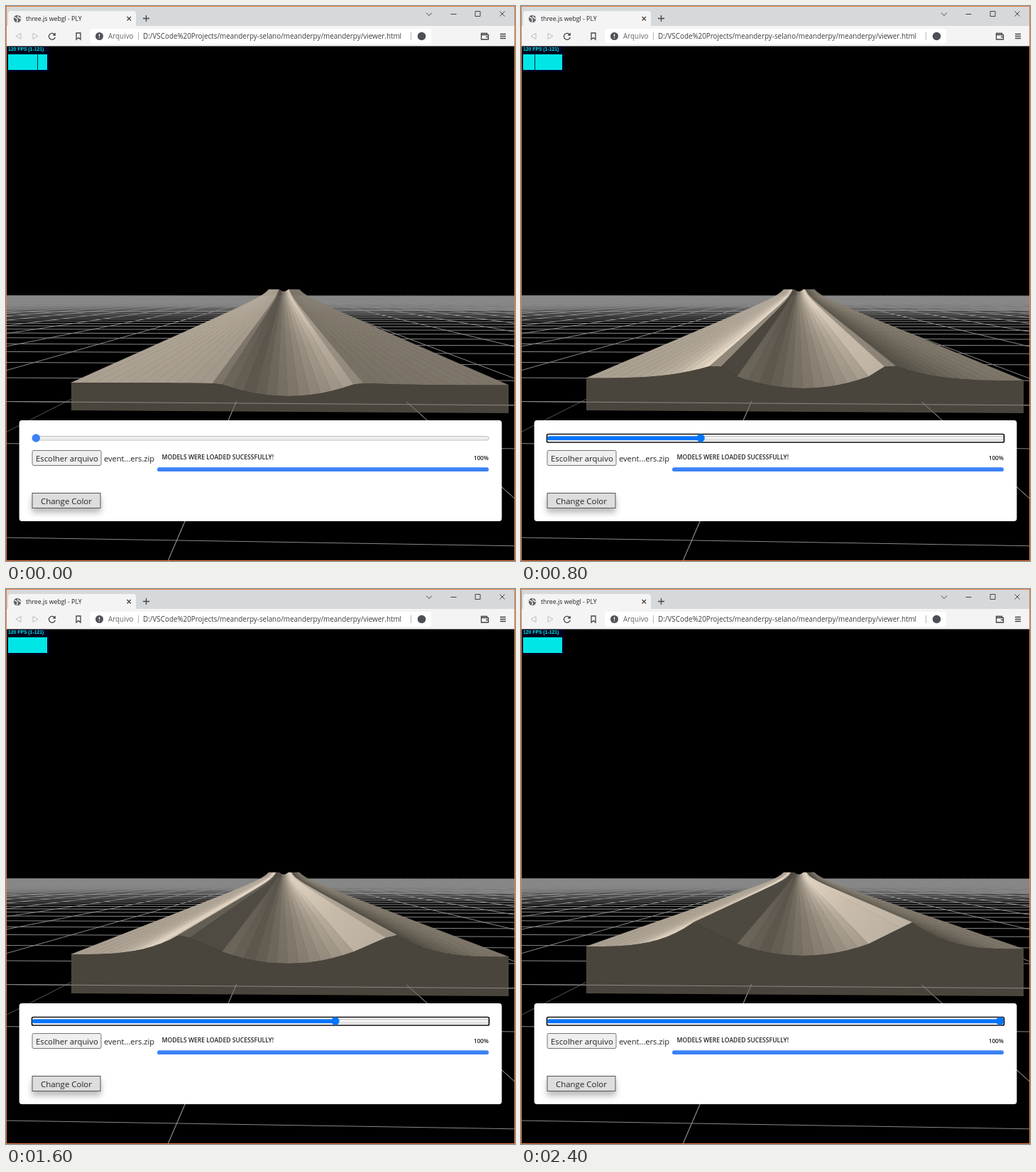
These frames come from a looping animation (717 by 781 pixels, 2600 ms). An HTML page with a canvas:

```html
<!DOCTYPE html>
<html lang="pt">
<head>
<meta charset="utf-8">
<title>three.js webgl - PLY</title>
<style>
html, body { margin: 0; width: 100%; height: 100%; overflow: hidden; background: #000; }
canvas, svg { position: absolute; left: 0; top: 0; width: 717px; height: 781px; }
text { font-family: "Open Sans", "Noto Sans", sans-serif; fill: #222; white-space: pre; }
.icon { fill: none; stroke: #444; stroke-width: 1; }
.bold { stroke-width: 1.3; }
#fps { font: bold 6.8px "Liberation Sans", Arial, sans-serif; fill: #00e6e6; }
</style>
</head>
<body>
<canvas id="scene" width="717" height="781"></canvas>
<svg viewBox="0 0 717 781">
  <defs>
    <filter id="shadow" x="-30%" y="-50%" width="160%" height="250%">
      <feDropShadow dx="0" dy="6" stdDeviation="4.5" flood-color="#000" flood-opacity=".28"/>
    </filter>
  </defs>

  <!-- browser frame -->
  <rect width="717" height="29" fill="#d5d9dc"/>
  <rect y="28" width="717" height="28.5" fill="#f4f4f4"/>
  <path d="M3 29V11q0-4 4-4H179q4 0 4 4V29z" fill="#f4f4f4"/>
  <circle cx="16" cy="18" r="5.2" fill="#5f6368"/>
  <path d="M12 16q3 .5 4 2.5t-1 4M17 13.5q-1 2.5 1 3t3 2" fill="none" stroke="#f4f4f4" stroke-width="1.3"/>
  <text x="28" y="21" font-size="8.75">three.js webgl - PLY</text>
  <path class="icon bold" d="M170.500 15l5.500 5.500m0-5.500l-5.500 5.500M193 17.500h9m-4.500-4.500v9"/>
  <path class="icon" d="M592 9.500l4 4 4-4M626.500 11.500h8M661 7.500h7v7h-7zM695.500 7.500l7 7m0-7l-7 7"/>
  <path class="icon" d="M21 38.500v8l-7-4zM38 38.500v8l7-4z" style="stroke:#bcbcbc"/>
  <path class="icon bold" d="M68.500 40a4.500 4.500 0 1 0 .8 4"/>
  <path d="M69.800 37.500v4.200h-4.200z" fill="#444"/>
  <path class="icon bold" d="M99 38h6v9l-3-2.500-3 2.500z"/>
  <rect x="118" y="32" width="481" height="21" rx="4" fill="#fff"/>
  <circle cx="131.500" cy="42.500" r="5.500" fill="#505358"/>
  <path d="M131.500 39.500v3.500m0 1.200v1.400" stroke="#fff" stroke-width="1.3"/>
  <text x="144" y="46" font-size="9.87" style="fill:#666">Arquivo</text>
  <path d="M186.500 37v11M570.500 37v11" stroke="#b5b8bb"/>
  <text x="193" y="46" font-size="9.87" style="fill:#3c3c3c">D:/VSCode%20Projects/meanderpy-selano/meanderpy/meanderpy/viewer.html</text>
  <circle cx="585.500" cy="42.500" r="5.800" fill="#4c4f54"/>
  <path class="icon bold" d="M669.500 40.500h10v6.500h-10zM669.500 40.500v-2h8v2M676 43.500h3.500"/>
  <path class="icon bold" d="M696 39.500h8m-8 3h8m-8 3h8"/>

  <!-- frame counter -->
  <rect x="1" y="57" width="60" height="36" fill="#00001f"/>
  <text id="fps" x="3" y="63.300">120 FPS (1-121)</text>
  <rect x="3" y="68" width="55" height="22" fill="#00e6e6"/>
  <rect id="tick" y="68" width="1" height="22" fill="#012a3a"/>

  <!-- control panel -->
  <rect x="18.600" y="583" width="679.800" height="142" rx="4" fill="#fff"/>
  <rect x="37" y="605.500" width="643" height="5.500" rx="2.700" fill="#efefef" stroke="#b2b2b2" stroke-width=".8"/>
  <g id="focus">
    <rect x="36.500" y="602.500" width="644" height="11.500" rx="2" fill="none" stroke="#101010" stroke-width="1.700"/>
    <rect id="fill" x="37" y="605.400" width="0" height="5.600" rx="2.800" fill="#0075ff"/>
  </g>
  <circle id="thumb" cy="608" r="5.700"/>
  <rect x="37" y="625.500" width="97" height="21" rx="2" fill="#efefef" stroke="#767676"/>
  <text x="42" y="640.500" font-size="11.35">Escolher arquivo</text>
  <text x="138" y="640.500" font-size="11.1">event...ers.zip</text>
  <text x="219.500" y="638" font-size="8.6" font-weight="600">MODELS WERE LOADED SUCESSFULLY!</text>
  <text x="680" y="638.500" font-size="8.3" font-weight="600" text-anchor="end">100%</text>
  <rect x="213" y="649.300" width="467" height="5.800" rx="2.900" fill="#3b82f6"/>
  <rect x="37" y="685.500" width="96" height="21" fill="#ddd" stroke="#555" filter="url(#shadow)"/>
  <text x="49" y="700.500" font-size="11.45">Change Color</text>
  <rect x=".5" y=".5" width="716" height="780" fill="none" stroke="#ee7a3a"/>
</svg>

<script>
const $ = id => document.getElementById(id);
const ctx = $('scene').getContext('2d');
const STEP = 200, COUNT = 13;
const VX = 391, VY = 402;            // vanishing point
const MID = 397, BANK = 92.5;        // channel axis and half width
const GROUND = 530, DEPTH = 14.3;    // front height, depth of the far end

const mix = (a, b, t) => a + (b - a) * t;

// Cross-section at the front: two levees that grow beside a rising channel.
function profile(p) {
  const bed = mix(549, 516, p), bank = bed - 16.5;
  const edge = 530 - 27 * p ** 1.3, crest = 531 - 62 * p ** .85;
  const crestD = 108 + 46 * Math.min(1, p * 1.5);
  const shoulder = 2 + 14 * Math.min(1, p * 3);

  const levee = side => {
    const at = (d, y) => ({ x: MID + side * d, y });
    const outer = side < 0 ? 305 : 311, low = side < 0 ? edge : edge + 3.5;
    const pts = [];
    for (let u = 0; u <= 12; u++) {
      pts.push(at(mix(outer, crestD, u / 12), mix(low, crest, (u / 12) ** 3.2)));
    }
    return [...pts, at(crestD - shoulder, crest + 8 * p * p), at(BANK, bank)];
  };

  const channel = [];
  for (let i = -5; i <= 5; i++) {
    const q = i / 6;
    channel.push({ x: MID + BANK * q, y: mix(bed, bank, q * q) });
  }
  return [...levee(-1), ...channel, ...levee(1).reverse()];
}

// Screen place of a front point carried back to depth z.
function project({ x, y }, z) {
  const s = 1 / z, back = (z - 1) / (DEPTH - 1);
  const lift = 6 * (z - 1) + .039 * (z - 1) ** 3;
  const q = (x - MID) / BANK, dip = 3 * Math.max(0, 1 - q * q) * back ** 3;
  const height = GROUND - VY - lift + (y - GROUND) * (1 - back);
  return [VX + (x - VX) * s, VY + height * s + dip];
}

function tone(l) {
  return `rgb(${l},${l * .94},${l * mix(.81, .87, l / 250)})`;
}

// Brightness of a facet at its front edge and at its far end, lit from the left.
function shade(a, b) {
  const rise = (a.y - b.y) / (b.x - a.x), d = (a.x + b.x) / 2 - MID;
  if (Math.abs(d) < BANK) {
    const u = (d / BANK + 1) / 2;
    const l = 92 + 100 * Math.max(0, u - .22) + 90 * Math.max(0, .22 - u);
    return [l, l + mix(-22, 62, u)];
  }
  if (d < 0) {
    if (rise < 0) {
      const l = 72 + 98 * Math.exp(rise / .17);
      return [l, l + (l - 72) * .12];
    }
    const l = 167 + 64 * Math.exp(-(((rise - .33) / .18) ** 2));
    return [l, l + 12];
  }
  if (rise > 0) {
    const l = 128 + 62 * Math.min(1, rise / .45);
    return [l, l + 35];
  }
  const l = 72 + 53 * Math.exp(rise / .25);
  return [l, l + 10];
}

function trace(pts) {
  ctx.beginPath();
  pts.forEach(p => ctx.lineTo(p[0], p[1]));
  ctx.closePath();
  ctx.fill();
}

function strip(a, b) {
  const near = [], far = [];
  for (let i = 0; i <= 14; i++) {
    const z = DEPTH ** (i / 14);
    near.push(project(a, z));
    far.unshift(project(b, z));
  }
  const [l0, l1] = shade(a, b);
  const g = ctx.createLinearGradient((a.x + b.x) / 2, (a.y + b.y) / 2, ...near[12]);
  g.addColorStop(0, tone(l0));
  g.addColorStop(.5, tone(mix(l0, l1, .3)));
  g.addColorStop(1, tone(l1));
  ctx.fillStyle = ctx.strokeStyle = g;
  ctx.lineWidth = .5;
  trace([...near, ...far]);
  ctx.stroke();
}

function line(x1, y1, x2, y2, color = '#888') {
  ctx.strokeStyle = color;
  ctx.lineWidth = 1;
  ctx.beginPath();
  ctx.moveTo(x1, y1);
  ctx.lineTo(x2, y2);
  ctx.stroke();
}

function across(i) {
  const h = 1 / (.00289 + i * .00179);
  line(0, VY + h, 717, VY + h * 1.034);
}

function along(n, from) {
  const s = -.43 + n * 1.548;
  line(VX + s * from, VY + from, VX + s * 380, VY + 380, n === -1 ? '#555' : '#888');
}

function draw(step) {
  ctx.fillStyle = '#000';
  ctx.fillRect(0, 0, 717, 781);
  for (let n = -48; n <= 48; n++) along(n, 6.3);
  for (let i = 0; i < 91; i++) across(i);
  ctx.fillStyle = 'rgba(136,136,136,.85)';
  ctx.fillRect(0, 408, 717, 11);

  const pts = profile(step / (COUNT - 1)), last = pts.length - 1;
  for (let i = 0; i < last / 2; i++) {
    strip(pts[i], pts[i + 1]);
    strip(pts[last - i - 1], pts[last - i]);
  }
  ctx.fillStyle = '#4a453c';
  trace([...pts.map(p => [p.x, p.y]), [708, 573], [92, 569]]);
  across(2);
  along(0, 154);
  along(1, 155);
}

function controls(step) {
  const x = 42.3 + step * 52.7, tick = 44.3 - step * 6.35;
  $('thumb').setAttribute('cx', x);
  $('thumb').setAttribute('fill', step ? '#0075ff' : '#3b82f6');
  $('fill').setAttribute('width', x - 37);
  $('focus').style.display = step ? '' : 'none';
  $('tick').setAttribute('x', Math.round(tick));
  $('tick').style.display = tick >= 3 ? '' : 'none';
  $('fps').textContent = (step === 9 || step === 10 ? 119 : 120) + ' FPS (1-121)';
}

let shown = -1;
function loop() {
  const step = Math.floor(performance.now() / STEP) % COUNT;
  if (step !== shown) {
    shown = step;
    draw(step);
    controls(step);
  }
  requestAnimationFrame(loop);
}
loop();
</script>
</body>
</html>
```
